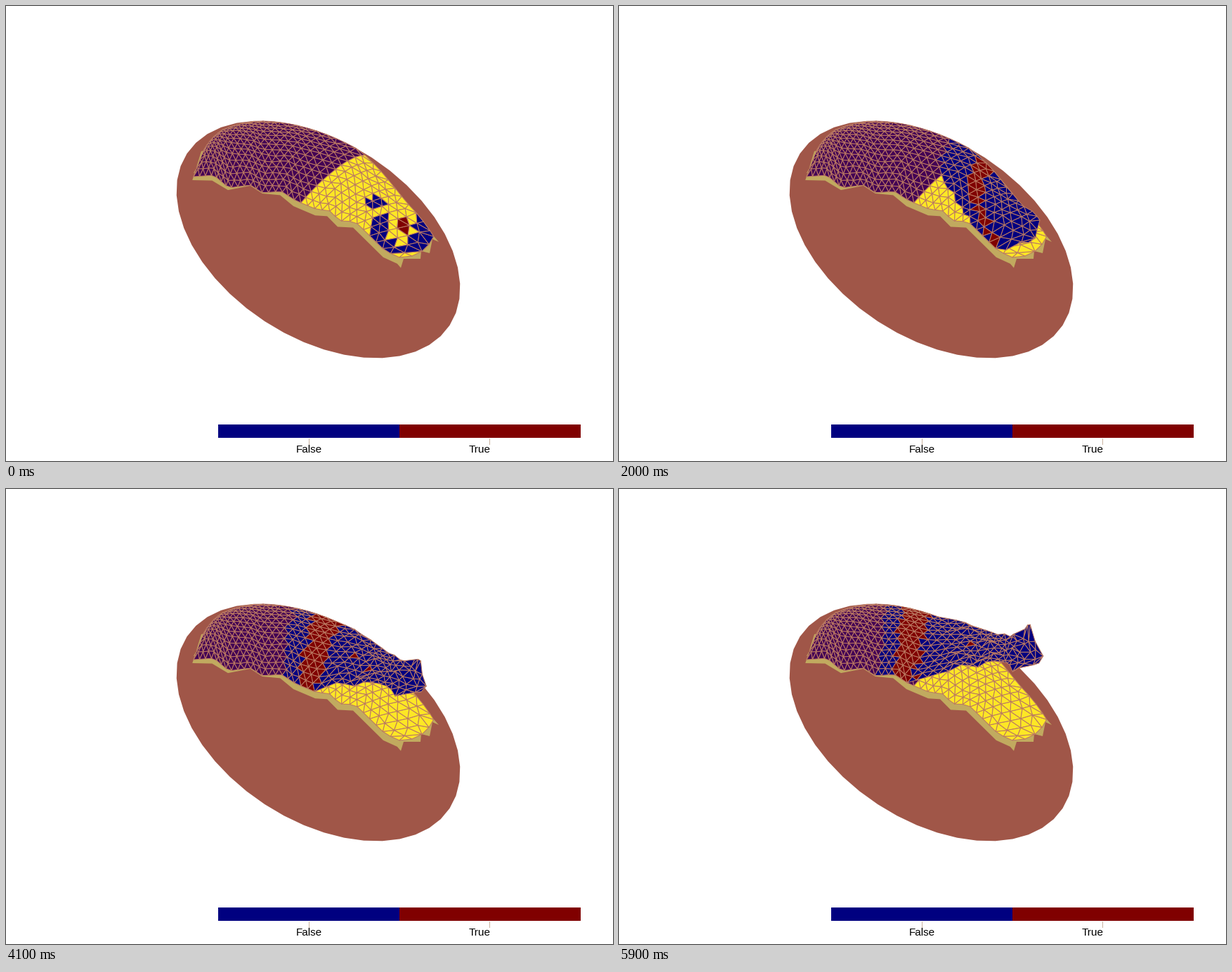
A matplotlib script for the animation above (6 s loop, 864 by 648 pixels).

```python
import numpy as np
import matplotlib.pyplot as plt
from matplotlib.animation import FuncAnimation
from matplotlib.collections import PolyCollection
from matplotlib.patches import Polygon, Rectangle
from matplotlib.tri import Triangulation

W, H, DPI = 864, 648, 100
FRAMES, STEP = 60, 100
BROWN, TAN, EDGE = "#a05648", "#c1aa5f", "#bb7a62"
PURPLE, YELLOW = "#440154", "#fde725"
BLUE, RED = "#000080", "#800000"

CENTER, LONG, SHORT, TILT = (444.5, 332.5), 223, 139, np.radians(33.2)
LOWER = np.array([(267, 243), (296, 241), (317, 259), (348, 255), (365, 266),
                  (392, 264), (412, 277), (443, 290), (460, 291), (475, 306),
                  (497, 307), (540, 349), (560, 358)], float)
TIP = [(562, 373), (566, 360), (590, 360), (591, 349), (603, 352), (607, 332),
       (616, 336), (609, 328)]
CELLS = 32      # mesh columns from the left end to the tip
ROW = .87       # height of one mesh row in cells
SEAM, LEAN = 18, .47    # the colour seam in mesh units: x = SEAM + LEAN * y

rng = np.random.default_rng(4)


def ellipse(angle, size=1.0):
    u, v = LONG * size * np.cos(angle), SHORT * size * np.sin(angle)
    c, s = np.cos(TILT), np.sin(TILT)
    return np.column_stack([CENTER[0] + u * c - v * s,
                            CENTER[1] + u * s + v * c])


steps = np.r_[0, np.cumsum(np.hypot(*np.diff(LOWER, axis=0).T))]
steps /= steps[-1]


def lower(q):
    return np.column_stack([np.interp(q, steps, LOWER[:, i]) for i in (0, 1)])


def upper(q):
    size = np.interp(q, [0, .13, .3, .62, .76, .84, 1],
                     [.93, .98, 1, 1, .91, .88, .905])
    return ellipse(np.radians(-173 + 125 * q), size)


def hump(v):
    return 4 * v * (1 - v)


def surface(q, v):
    """Screen position on the shell: q along it, v across it."""
    swell = np.clip((q - .85) / .15, 0, 1) * hump(v)
    lo, up = lower(q), upper(q)
    return lo + (up - lo) * v[:, None] + swell[:, None] * (5, 8)


def to_q(x):
    """Columns get wider towards the tip."""
    return (40 - np.sqrt(1600 - 32 * np.clip(x, 0, CELLS))) / 16


def height(x):
    return np.interp(to_q(x), [0, .15, .3, .5, .7, 1], [4, 10, 13, 11.5, 8.5, 4])


def shell_points():
    """Sheared triangle lattice that has one line of points on the seam."""
    pts = [(x, 0) for x in range(CELLS + 1)]
    top = SEAM
    for _ in range(20):
        top = SEAM + LEAN * height(top)
    tops = np.arange(top % 1, CELLS, 1)
    pts += [(x, height(x)) for x in (0, *tops, CELLS)]
    for end in (0, CELLS):
        rows = int(height(end))
        pts += [(end, y) for y in np.linspace(0, height(end), rows + 1)[1:-1]]
    for y in ROW * np.arange(1, 16):
        for x in np.arange((SEAM + LEAN * y) % 1, CELLS, 1):
            if .4 < x < CELLS - .4 and y < height(x) - .45:
                dy = rng.normal(0, .06)
                pts.append((x + LEAN * dy, y + dy))
    return np.array(pts, float)


flat = shell_points()
cells = Triangulation(*flat.T).triangles
mx, my = flat[cells].mean(axis=1).T
inside = my < height(mx) + .03
cells, is_yellow = cells[inside], (mx > SEAM + LEAN * my)[inside]

q = to_q(flat[:, 0])
turn = 1.5 - .6 * q
v = np.sin(flat[:, 1] / height(flat[:, 0]) * turn) / np.sin(turn)
base = surface(q, v)
crumple = rng.normal(0, 1, base.shape)

cq, cv = q[cells].mean(axis=1), v[cells].mean(axis=1)
cx, cy = base[cells].mean(axis=1).T
grain = rng.normal(0, 1, len(cells))
speck = rng.random(len(cells)) < .012


def left_over(t):
    return (1 - t / (FRAMES - 1)) ** 2


def front(t, v):
    """Where the crack front crosses the shell: slanted first, then upright."""
    e = left_over(t)
    slant = 1.2 * e ** 2
    return .44 + .85 * e + slant * (.5 - v - .45 * hump(v))


def half_band(t):
    return .042 - .025 * left_over(t)


def blob(x, y, rx, ry=None):
    """Positive inside an ellipse, roughly in pixels."""
    ry = ry or rx
    return (1 - np.hypot((cx - x) / rx, (cy - y) / ry)) * min(rx, ry)


def ring_scores():
    ring = np.minimum(blob(562, 316, 41), -blob(562, 314, 23))
    ring = np.minimum(ring, cy - 297)
    return np.maximum(ring, blob(524, 279, 15, 7)), blob(568, 309, 7)


def patch_scores():
    holes = np.maximum(blob(540, 328, 14), blob(585, 297, 13))
    blue = np.minimum((cq - .74) * 360, -holes)
    return blue, np.maximum(blob(547, 284, 13, 25), blob(586, 327, 20, 13))


def band_scores(t):
    d, half = cq - front(t, cv), half_band(t)
    red = (half - np.abs(d)) * 360
    red = np.where(speck & (d > .05) & (d < .25), 20, red)
    return (d + half + .06 + .1 * left_over(t)) * 360, red


def scores(t):
    """Blue and red cell scores: a ring, then patches, then a moving band."""
    if t >= 20:
        return band_scores(t)
    if t <= 8:
        a, b, f = ring_scores(), patch_scores(), t / 8
    else:
        a, b, f = patch_scores(), band_scores(20), (t - 8) / 12
    return [x * (1 - f) + y * f for x, y in zip(a, b)]


def lifted(t):
    """Vertices of the shell with the part behind the front peeled up."""
    lift = np.clip((t - 12) / 47, 0, 1)
    fold = np.minimum(front(t, v) + half_band(t), .95)
    w = np.clip((q - fold) / (1 - fold), 0, 1)
    curl = hump(v) * w ** 3 * lift
    dx = w * (18 - 42 * v) * np.sqrt(lift)
    dx += 25 * np.sin(np.pi * w) * (1 - v) * lift + 18 * curl
    dy = 8 * curl - lift * (103 + 31 * v) * w ** (.75 + v)
    rough = 2.4 * np.sqrt(w * lift)
    return base + np.column_stack([dx, dy]) + crumple * rough[:, None]


def rim():
    """Thin shell edge that shows below the mesh."""
    depth = np.interp(steps, [0, .1, .2, .36, .43, 1], [5, 8, 1, 1, 8, 9])
    outer = LOWER + depth[:, None] * (-.35, 1)
    inner = LOWER[::-1] - (0, 5)
    return np.vstack([[(278, 207)], outer, TIP, inner, [(284, 205)]])


fig = plt.figure(figsize=(W / DPI, H / DPI), dpi=DPI, facecolor="white")
ax = fig.add_axes([0, 0, 1, 1])
ax.set(xlim=(0, W), ylim=(H, 0))
ax.axis("off")

turns = np.linspace(0, 2 * np.pi, 44, endpoint=False)
ax.add_patch(Polygon(ellipse(turns, 1.002), fc=BROWN, lw=0))
ax.add_patch(Polygon(rim(), fc=TAN, lw=0))

mesh_style = dict(edgecolors=EDGE, linewidths=.75, joinstyle="round")
ax.add_collection(PolyCollection(base[cells], zorder=2, **mesh_style,
                                 facecolors=np.where(is_yellow, YELLOW, PURPLE)),
                  autolim=False)
peel = PolyCollection([], zorder=3, **mesh_style)
ax.add_collection(peel, autolim=False)

for x, color, label, lx in ((302, BLUE, "False", 431),
                            (559.5, RED, "True", 674.5)):
    ax.add_patch(Rectangle((x, 596), 258, 19, fc=color, lw=0))
    ax.plot([x + 128.7] * 2, [616, 624], color="#c9b3a0", lw=.72)
    ax.text(lx, 636, label, family="Liberation Sans", size=11,
            ha="center", va="baseline", color="black")


def draw(t):
    blue, red = scores(t)
    is_red = red + 2 * grain > 0
    shown = (blue + 2 * grain > 0) | is_red
    peel.set_verts(lifted(t)[cells[shown]])
    peel.set_facecolor(np.where(is_red[shown], RED, BLUE))
    return [peel]


anim = FuncAnimation(fig, draw, frames=FRAMES, interval=STEP, repeat=True)
plt.show()
```
